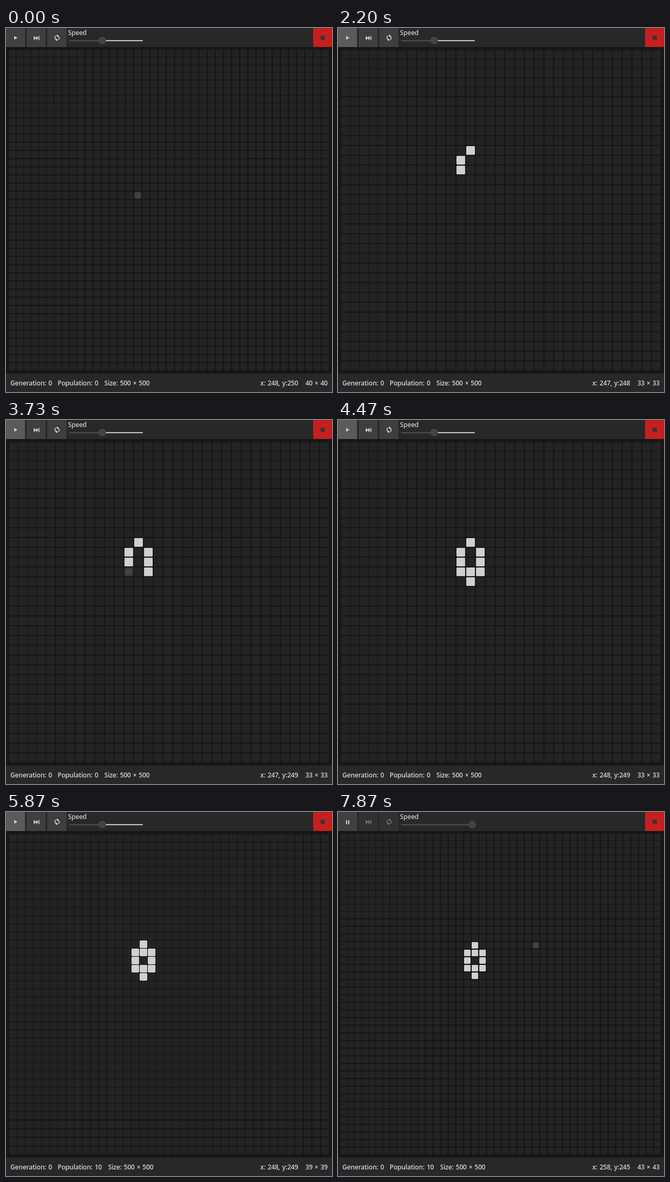
Recreate the animation shown at these times as an HTML page with a canvas. Size 600 by 669 pixels, loop 8000 ms.

```html
<!DOCTYPE html>
<html lang="en">
<head>
<meta charset="utf-8">
<title>Cell grid</title>
<style>
  html, body { margin: 0; width: 100%; height: 100%; overflow: hidden; background: #171717; }
  #stage { position: relative; width: 600px; height: 669px; overflow: hidden; color: #d2d2d2;
    font: 600 12px/16px "Open Sans", "Noto Sans", sans-serif; letter-spacing: -0.2px; word-spacing: 1px; }
  canvas, svg { position: absolute; left: 0; top: 0; }
  .bar { position: absolute; left: 0; width: 600px; background: #282828; }
  #top { top: 0; height: 35px; }
  #bottom { top: 635px; height: 34px; }
  .text { position: absolute; white-space: pre; }
  #bottom .text { top: 10px; }
  #speed { left: 114px; top: 1px; color: #c6c6c6; }
  #gen { left: 8px; }
  #pop { left: 95px; }
  #pos { left: 468px; }
  #dim { right: 8px; }
</style>
</head>
<body>
<div id="stage">
  <canvas id="grid" width="600" height="669"></canvas>
  <div class="bar" id="top">
    <svg width="600" height="36">
      <rect id="playBox" width="35" height="35" rx="1.5"/>
      <g id="tools" fill="#3e3e3e">
        <rect x="38" width="35" height="35" rx="1.5"/>
        <rect x="76" width="35" height="35" rx="1.5"/>
      </g>
      <g id="icons" fill="#cfcfcf">
        <path d="M51 14.5l4.6 4-4.6 4zM55.6 14.5l4.4 4-4.4 4zM60 14.5h1.4v8H60z"/>
        <g id="arrow">
          <path d="M96.6 21.4A3.8 4.2 0 0 0 95 14.2" fill="none" stroke="#cfcfcf" stroke-width="1.6"/>
          <path d="M95.6 11.7v5l-3.4-2.5z"/>
        </g>
        <use href="#arrow" transform="rotate(180 94 18)"/>
      </g>
      <path id="play" d="M15 14.7l6 3.4-6 3.4z" fill="#d2d2d2"/>
      <path id="pause" d="M14.8 15h2v7.5h-2zM18.8 15h2v7.5h-2z" fill="#d2d2d2"/>
      <rect x="565.5" y=".5" width="34" height="34" rx="2" fill="#c4201f" stroke="#b41e1e"/>
      <path d="M579.5 14.5l7 7M586.5 14.5l-7 7" stroke="#363030" stroke-width="3.2"/>
      <rect id="trackLeft" x="116" y="22.5" height="2" rx="1" fill="#505050"/>
      <rect id="trackRight" y="22.3" height="2" rx="1" fill="#d0d0d0"/>
      <circle id="thumb" cy="23" r="7" fill="#434343"/>
    </svg>
    <span class="text" id="speed">Speed</span>
  </div>
  <div class="bar" id="bottom">
    <span class="text" id="gen">Generation: 0</span>
    <span class="text" id="pop"></span>
    <span class="text" id="size">Size: 500 × 500</span>
    <span class="text" id="pos"></span>
    <span class="text" id="dim"></span>
  </div>
</div>
<script>
const LOOP = 8000, TICK = LOOP / 120;
const AREA = 590, LEFT = 5, TOP = 40, DRAWN_AT = 33;
const START = [242, 307];
// Pointer moves: start tick, length in ticks, end point.
const MOVES = [
  [4, 5, 248, 272], [12, 6, 248, 225], [24, 3, 226, 243], [32, 1, 226, 261],
  [38, 6, 262, 243], [48, 2, 262, 279], [53, 3, 226, 279], [60, 1, 248, 279],
  [63, 1, 248, 297], [66, 3, 248, 243], [71, 3, 248, 297], [89, 5, 224, 59],
  [94, 1, 168, 30], [108, 1, 17, 18], [110, 8, 364, 245]
];
// Ticks at which the button is down and paints the cell under the pointer.
const PRESSES = [25, 32, 33, 48, 49, 50, 59, 62, 65, 70];

const $ = id => document.getElementById(id);
const ctx = $('grid').getContext('2d');
const ramp = (v, from, to) => Math.min(1, Math.max(0, (v - from) / (to - from)));

const viewSize = k => Math.round(40 - ramp(k, 8, 9) - 6 * ramp(k, 12, 18)
  + 6 * ramp(k, 79, 85) + 4 * ramp(k, 88, 92));

function pointerAt(k) {
  let [x, y] = START;
  for (const [from, ticks, toX, toY] of MOVES) {
    const p = ramp(k, from, from + ticks);
    x += (toX - x) * p;
    y += (toY - y) * p;
  }
  return [x, y];
}

// Whole-pixel cell spans; the narrower ones come first.
function spans(n) {
  const base = Math.floor(AREA / n), narrow = n - AREA % n;
  const len = Math.ceil(AREA / n) - 2;
  return Array.from({ length: n }, (_, i) => {
    const start = i * base + Math.max(0, i - narrow);
    const inset = n >= 40 && i < narrow ? 0 : 1;
    return { start, end: start + base + (i >= narrow), at: start + inset, len };
  });
}

function cellAt(k, cells) {
  const find = v => cells.findIndex(s => v >= s.start && v < s.end);
  const [x, y] = pointerAt(k);
  return [find(x - LEFT), find(y - TOP)];
}

function drawCell(col, row, fill, edge) {
  ctx.beginPath();
  ctx.roundRect(LEFT + col.at, TOP + row.at, col.len, row.len, 2);
  ctx.fillStyle = fill;
  ctx.fill();
  if (!edge) return;
  ctx.beginPath();
  ctx.roundRect(LEFT + col.at + 0.5, TOP + row.at + 0.5, col.len - 1, row.len - 1, 1.5);
  ctx.strokeStyle = edge;
  ctx.stroke();
}

function hoverFill(col, row) {
  const x = LEFT + col.at + col.len / 2, y = TOP + row.at + row.len / 2;
  const g = ctx.createRadialGradient(x, y, 1, x, y, col.len * 0.65);
  g.addColorStop(0, '#484848');
  g.addColorStop(1, '#333333');
  return g;
}

function drawGrid(k, n, cells, [hoverCol, hoverRow]) {
  ctx.fillStyle = '#171717';
  ctx.fillRect(0, 0, 600, 669);
  for (const row of cells) for (const col of cells) drawCell(col, row, '#232323');

  const col = cells[hoverCol], row = cells[hoverRow];
  if (col && row) drawCell(col, row, hoverFill(col, row));

  const drawn = spans(DRAWN_AT), shift = Math.floor((n - DRAWN_AT) / 2);
  for (const press of PRESSES.filter(p => p <= k)) {
    const [c, r] = cellAt(press, drawn);
    drawCell(cells[c + shift], cells[r + shift], '#d0d0d0', '#c8c8c8');
  }
}

function drawChrome(k, n, [col, row]) {
  const counted = k >= 80, running = k >= 109, disabled = k >= 110;
  const thumb = 177 + 29 * ramp(k, 101, 102) + 41 * ramp(k, 102, 103);
  $('thumb').setAttribute('cx', thumb);
  $('trackLeft').setAttribute('width', thumb - 116);
  $('trackRight').setAttribute('x', thumb);
  $('trackRight').setAttribute('width', 252 - thumb);
  $('play').style.display = running ? 'none' : '';
  $('pause').style.display = running ? '' : 'none';
  $('icons').style.opacity = disabled ? 0.42 : 1;
  $('tools').style.opacity = disabled ? 0.45 : 1;

  const zoom = n - DRAWN_AT;
  const x = col + Math.max(232, Math.round(235 - 0.5 * zoom));
  const y = row + Math.round(236 - 0.6 * zoom);
  $('pop').textContent = `Population: ${counted ? PRESSES.length : 0}`;
  $('size').style.left = counted ? '188px' : '181px';
  $('pos').textContent = `x: ${x}, y:${y}`;
  $('dim').textContent = `${n} × ${n}`;
}

let lastTick = -1;
function frame(now) {
  const t = (now + 5) % LOOP, k = Math.floor(t / TICK);
  const shade = Math.round(65 + 26 * ramp(t, 0, 2200) - 9 * ramp(t, 5870, 6800) - 18 * ramp(t, 6800, 7870));
  $('playBox').setAttribute('fill', `rgb(${shade},${shade},${shade})`);
  if (k === lastTick) return;
  lastTick = k;
  const n = viewSize(k), cells = spans(n), hover = cellAt(k, cells);
  drawGrid(k, n, cells, hover);
  drawChrome(k, n, hover);
}

const begin = performance.now();
function loop() {
  frame(performance.now() - begin);
  requestAnimationFrame(loop);
}
loop();
</script>
</body>
</html>
```
